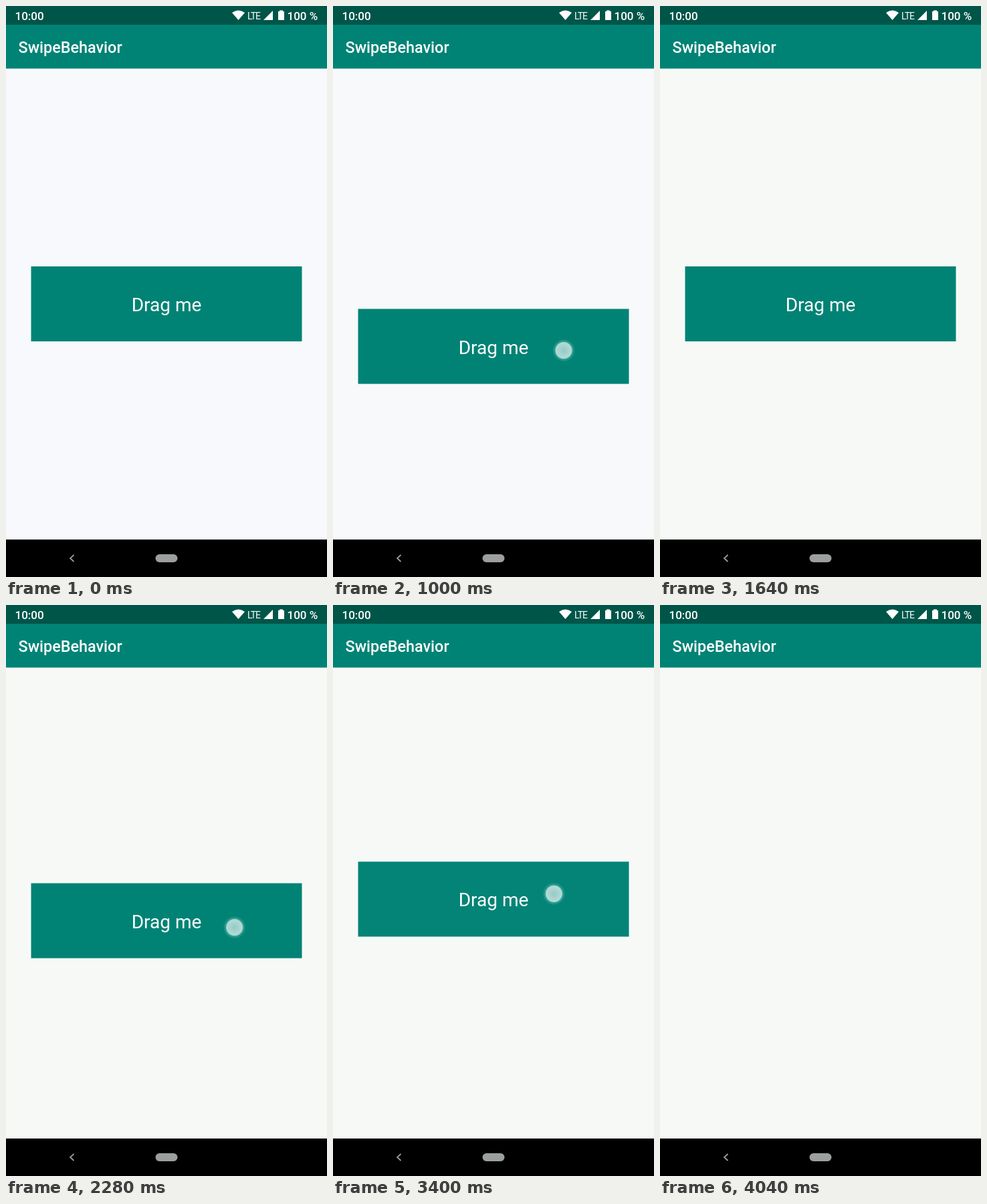
An HTML page for the animation above (4160 ms loop, 480 by 853 pixels).

```html
<!DOCTYPE html>
<html lang="en">
<head>
<meta charset="utf-8">
<title>SwipeBehavior</title>
<style>
  html, body { margin: 0; width: 100%; height: 100%; overflow: hidden; }
  svg { display: block; width: 480px; height: 853px; font-family: Roboto, sans-serif; }
  text { fill: #fff; }
  .status { font-size: 17px; font-weight: 500; }
</style>
</head>
<body>
<svg viewBox="0 0 480 853">
  <defs>
    <radialGradient id="dot">
      <stop offset="0" stop-color="#fff" stop-opacity=".58"/>
      <stop offset=".66" stop-color="#fff" stop-opacity=".7"/>
      <stop offset=".72" stop-color="#cff0ea" stop-opacity=".7"/>
      <stop offset=".77" stop-color="#9fdcd3" stop-opacity=".32"/>
      <stop offset="1" stop-color="#9fdcd3" stop-opacity="0"/>
    </radialGradient>
  </defs>

  <rect id="page" width="480" height="853"/>
  <rect width="480" height="93.5" fill="#008375"/>
  <rect width="480" height="28" fill="#005549"/>
  <text x="18.5" y="70" font-size="23.4" font-weight="500">SwipeBehavior</text>

  <text class="status" x="13.5" y="20.5">10:00</text>
  <text x="361" y="19.5" font-size="14" letter-spacing="-1">LTE</text>
  <text class="status" x="420.5" y="20.5">100 %</text>
  <path fill="#fff" d="M347.5 21L338 10Q347.5 3 357 10ZM385 21H399V7ZM407 8H409V6.5H414V8H416V21H407Z"/>

  <g id="card">
    <rect x="37.5" width="405" height="112" fill="#008375"/>
    <text x="240" y="67" font-size="28" text-anchor="middle">Drag me</text>
  </g>
  <circle id="touch" r="17" fill="url(#dot)"/>

  <rect y="797" width="480" height="56" fill="#000"/>
  <path d="M101.5 820L96 825L101.5 830" fill="none" stroke="#9b9f9d" stroke-width="1.7"/>
  <rect x="223.5" y="819" width="33" height="12" rx="6" fill="#9b9f9d"/>
</svg>

<script>
const LOOP = 4160, STEP = 40, REST_Y = 389, FADE_DISTANCE = 405;
const [page, card, touch] = ['page', 'card', 'touch'].map(id => document.getElementById(id));

const clamp = v => Math.min(1, Math.max(0, v));
const progress = (t, from, to) => clamp((t - from) / (to - from));
const mix = (a, b, u) => a + (b - a) * u;
const smooth = u => u * u * (3 - 2 * u);
const settle = u => 1 - (1 - u) ** 5;

// Each gesture drags the card by `dist`, then lets it settle at `end`.
const gestures = [
  { down: 760, start: 800, stop: 1200, release: 1220, settled: 1580,
    dist: 127, end: 0, grip: 62, x: [338, 352], ease: smooth, easeX: smooth },
  { down: 2120, start: 2180, stop: 2600, release: 2620, settled: 2920,
    dist: 186, end: 0, grip: 66, x: [345, 322], ease: smooth, easeX: smooth },
  { down: 3280, start: 3300, stop: 3750, release: 3750, settled: 4040,
    dist: -113, end: -FADE_DISTANCE, grip: 48, x: [330, 428],
    ease: u => u * u, easeX: u => u ** 3.7 },
];

function draw(t) {
  const g = gestures.findLast(g => t >= g.down) || gestures[0];
  const u = progress(t, g.start, g.stop);
  const dragged = g.dist * g.ease(u);
  const offset = mix(dragged, g.end, settle(progress(t, g.release, g.settled)));

  card.setAttribute('transform', `translate(0 ${REST_Y + offset})`);
  card.setAttribute('opacity', clamp(1 + Math.min(0, offset) / FADE_DISTANCE));

  touch.setAttribute('cx', mix(...g.x, g.easeX(u)));
  touch.setAttribute('cy', REST_Y + g.grip + dragged);
  touch.setAttribute('opacity',
    progress(t, g.down - STEP, g.down + 60) * (t >= g.down) * (1 - progress(t, g.release, g.release + 110)));

  const tint = progress(t, 760, 1300);
  page.setAttribute('fill', `rgb(247 249 ${Math.round(mix(253, 247, tint))})`);
}

function tick() {
  const t = performance.now() % LOOP;
  draw(Math.floor(t / STEP) * STEP);
  requestAnimationFrame(tick);
}
tick();
</script>
</body>
</html>
```
